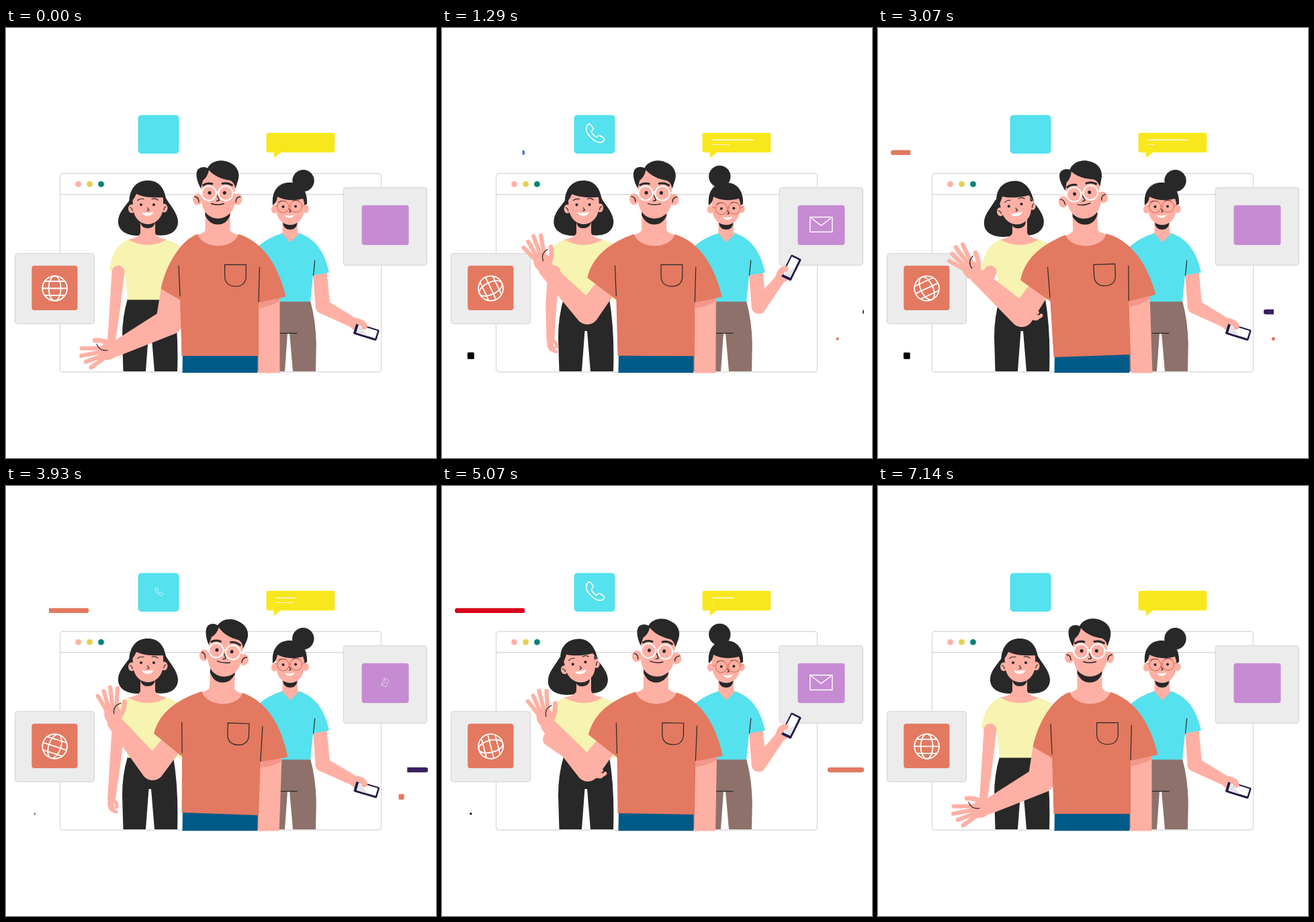
Animation, 640 px wide and 640 px high, one loop 7210 ms. Source, as an HTML page:

```html
<!DOCTYPE html>
<html lang="en">
<head>
<meta charset="utf-8">
<title>Team greeting</title>
<style>
html, body { margin: 0; width: 100%; height: 100%; overflow: hidden; background: #fff; }
svg { display: block; width: 100vw; height: 100vh; }
.skin { fill: #ffb0a4; }
.skinLine { fill: none; stroke: #ffb0a4; stroke-linecap: round; stroke-linejoin: round; }
.dark { fill: #282828; }
.ink { fill: none; stroke: #282828; stroke-linecap: round; stroke-linejoin: round; stroke-width: 1.2; }
.white { fill: none; stroke: #fff; }
.card { fill: #ececec; stroke: #d8d8d8; stroke-width: 1.3; }
.frame { fill: none; stroke: #dadada; stroke-width: 1.4; }
</style>
</head>
<body>
<svg viewBox="0 0 640 640">
  <defs>
    <clipPath id="floor"><rect width="640" height="513.5"/></clipPath>
    <clipPath id="clipA"><rect id="wipeA" y="170" height="30"/></clipPath>
    <clipPath id="clipB"><rect id="wipeB" y="410" height="30"/></clipPath>
  </defs>

  <!-- window -->
  <rect class="frame" x="80.5" y="216.5" width="478" height="295.5" rx="4"/>
  <path class="frame" d="M80.5 247.7H558.5"/>
  <circle cx="107.6" cy="232.4" r="4.4" fill="#ffb0a4"/>
  <circle cx="124.6" cy="232.4" r="4.4" fill="#e6d04e"/>
  <circle cx="141.5" cy="232.4" r="4.4" fill="#008577"/>

  <!-- loose marks -->
  <rect id="dashA" x="19" y="181.7" width="104.5" height="7.4" rx="3.7" clip-path="url(#clipA)"/>
  <rect id="dashB" x="573.8" y="418.8" width="54.4" height="7.4" rx="3.7" clip-path="url(#clipB)"/>
  <rect id="boxA" x="-5" y="-5" width="10" height="10" rx="1.5"/>
  <rect id="boxB" x="-5" y="-5" width="10" height="10" rx="1.5" fill="#e37960"/>

  <!-- call tile -->
  <rect x="196.5" y="129.5" width="61" height="57.5" rx="5" fill="#55e1ed"/>
  <path id="call" class="white" stroke-width="1.7" stroke-linejoin="round" d="M-13-9.5C-16-1 0 14 8 12.700C12 12.500 14 9.500 13.500 7L7 2.500C5 1.500 4 3.500 2 5C-1 3.500-5-.5-6-3.500C-5-5-2-6.500-3-8.500L-7.500-14.500C-10-15-12-13-13-9.500Z"/>

  <!-- speech bubble -->
  <path d="M390 156H487Q489.300 156 489.300 158V183Q489.300 185.200 487 185.200H409L399 193V185.200H390Q387.600 185.200 387.600 183V158Q387.600 156 390 156Z" fill="#f8e71c"/>
  <path id="lineA" class="white" stroke-width="1.3"/>
  <path id="lineB" class="white" stroke-width="1" opacity=".85"/>

  <!-- globe card -->
  <rect class="card" x="13.5" y="335.700" width="118" height="104.500" rx="4"/>
  <rect x="38.300" y="353.700" width="68.200" height="66.300" rx="4" fill="#e37960"/>
  <g id="globe" class="white" stroke-width="1.8">
    <circle r="18.400"/><ellipse rx="9" ry="18.400"/>
    <path d="M-18.400 0H18.400M-15.200-10.500H15.200M-15.200 10.500H15.200"/>
  </g>

  <!-- mail card -->
  <rect class="card" x="502.300" y="237.600" width="124" height="115.500" rx="4"/>
  <rect x="529.500" y="263.800" width="70" height="59.300" rx="4" fill="#c68bd2"/>
  <path id="mail" class="white" stroke-width="1.4" d="M-16.500-11H16.500V11H-16.500ZM-16.500-11L0 1.500L16.500-11"/>

  <g clip-path="url(#floor)">
    <!-- woman on the left -->
    <g>
      <path id="bob" class="dark" d="M186 253C178 266 166 275 167 290C168 304 184 310 200 309L223 308C241 311 256 304 256 288C255 274 244 264 238 253Z"/>
      <path class="dark" d="M181 403Q173 430 173 460L174.500 511H208L212.500 451H216L221 511H255Q257 450 249 403Z"/>
      <path class="skin" d="M200 280H222V305Q224 312 239 315V330H181V315Q198 312 200 305Z"/>
      <path fill="#f7f3b0" d="M182 315Q211 331 239 315C256 320 268 330 280 350V404.500H181L177 366L154 361C156 342 163 322 182 315Z"/>
      <path id="armL" class="skin"/>
      <g id="handL">
        <path class="skinLine" stroke-width="9" d="M0 0Q-3 8 1 14"/>
        <path class="skinLine" stroke-width="5" d="M0 12Q2 18 7 19M3 2Q9 5 8 12"/>
      </g>
      <g id="headL">
        <path class="dark" d="M200 286Q200 298 211 298Q222 298 222 286Z"/>
        <ellipse class="skin" cx="187" cy="269" rx="5" ry="6.500"/>
        <ellipse class="skin" cx="235.500" cy="268" rx="5" ry="6.500"/>
        <path class="skin" d="M188 245H234V267C233 283 222 292 211.500 292C200 292 190 283 189 267Z"/>
        <path class="dark" d="M183 263C183 239 194 227 211 227C228 227 238 239 239 263Q236 258 233 252C220 253 205 252 194 247Q190 256 183 263Z"/>
        <path class="ink" stroke-width="1.500" d="M196 256.500Q199 253.500 205 254.500M217 254.500Q222 252.500 226 256M210.500 267.500L213 271L210 272M184.500 267Q188 268 188 272M238 266Q235 267 235 271"/>
        <circle class="dark" cx="201" cy="263" r="2.100"/><circle class="dark" cx="220" cy="263" r="2.100"/>
        <path fill="#fff" d="M202 274.500Q211 276 219.500 274Q217 279.500 211 279.500Q204 279.500 202 274.500Z"/>
      </g>
    </g>

    <!-- woman on the right -->
    <g>
      <path fill="#8e716b" d="M370 406H453Q461 435 461.800 470L461 511H427L422 454H419L415 511H370Z"/>
      <path class="ink" stroke-width="1" d="M408 454.300H433"/>
      <path id="armR" class="skin"/>
      <g id="foreR">
        <path id="foreRshape" class="skin"/>
        <ellipse class="skin" cx="58" cy="0" rx="11.500" ry="9.500"/>
        <g transform="translate(75 3) rotate(-11)">
          <rect x="-18" y="-8.500" width="36" height="17" rx="2" fill="#201a48"/>
          <rect x="-14" y="-6.500" width="29.500" height="12" rx="1" fill="#fff"/>
          <path d="M-14-6.500L4 5.500H-14Z" fill="#e4e4e4"/>
        </g>
        <path class="skinLine" stroke-width="9" d="M58-5Q65-7 68.500-2.500"/>
      </g>
      <path class="skin" d="M411.500 280H434V304L438 308L423 325L410 308L411.500 304Z"/>
      <path fill="#55e1ed" d="M411 305.500L423 319L437 305.500C460 314 474 332 481 364L457 368L453 407.300H370V330Q388 312 411 305.500Z"/>
      <path class="ink" d="M459.700 346L457.500 368"/>
      <circle id="bun" class="dark" r="16.200"/>
      <path class="dark" d="M411.500 286Q412 300 423 300Q433.500 300 434 286Z"/>
      <ellipse class="skin" cx="399.500" cy="270" rx="4.700" ry="6"/>
      <ellipse class="skin" cx="446" cy="269.500" rx="4.700" ry="6"/>
      <path class="skin" d="M401 250H444V269C443 285 433 293 423 293C411 293 403 284 402 269Z"/>
      <path class="dark" d="M397 264C395 243 405 230 422 230C440 230 449 243 448 262L444 264Q444 258 442 254C427 258 412 256 404 251Q403 260 397 264Z"/>
      <g id="faceR">
        <path class="ink" stroke-width="1.500" d="M406 259.500Q410 256 416 258M427 257.500Q432 255 437 258.500M421.500 269L424 273.500L421.500 274"/>
        <circle class="dark" cx="412.500" cy="266" r="2"/><circle class="dark" cx="431" cy="265.500" r="2"/>
        <g fill="none" stroke="#dc7763" stroke-width="1.200">
          <circle cx="412.500" cy="266.300" r="8.700"/><circle cx="431.800" cy="265.600" r="8.700"/>
          <path d="M421 265L423.300 264.900M404 265L399 264M440.500 264.500L445 263.500"/>
        </g>
        <path fill="#fff" d="M415 278.500Q422 280 429.500 278Q427 282.500 422 282.500Q417 282.500 415 278.500Z"/>
      </g>
    </g>

    <!-- man -->
    <path fill="#005a87" d="M263 480H374.300V513.500H262.500Z"/>
    <g id="man">
      <path class="skin" d="M375.500 400H407.500V520H375.500Z"/>
      <path fill="#f4968a" d="M376 407L407.500 402V406Q394 415 376 417Z"/>
      <path id="armM" class="skin"/>
      <g id="handM">
        <ellipse class="skin" cx="1" cy="2" rx="12.500" ry="15.500"/>
        <path class="skinLine" stroke-width="6.200" d="M-7-6L-15.400-29M-3-8L-5.400-34.500M3-8L5.100-38.500M8-6L15.600-35"/>
        <path class="skinLine" stroke-width="7" d="M7 10Q18 3 22-13"/>
        <path class="ink" d="M3 1Q4-11 16-12"/>
      </g>
      <path class="skin" d="M296.500 268H333.500V301Q336 306 347 308V328H284V308Q295 305 296.500 301Z"/>
      <path fill="#e37960" d="M285 306.800C293 330 339 330 346 306.800C382 318 405 352 416.500 400L376 408.500V488H261.500L259 400L262 330Z"/>
      <path id="sleeve" fill="#e37960"/>
      <path class="ink" d="M257 354L259 399M377.300 356L376 407.500M325.500 352.300H357.300V371Q356 384.500 341.500 384.500Q327 384 325.700 371Z"/>
      <g id="headM">
        <path class="dark" d="M296.500 270V279Q303 292.500 315 292.500Q328 292.500 333.500 279V270Z"/>
        <ellipse class="skin" cx="285" cy="255" rx="7" ry="8.500"/>
        <ellipse class="skin" cx="344.500" cy="255" rx="7" ry="8.500"/>
        <path class="skin" d="M290.500 224Q300 206 316 208Q338 212 341 226V257C340 274 328 283.500 315.500 283.500C302 283.500 292 273 291 257Z"/>
        <path class="dark" d="M290 239C284 228 281 216 286 210Q292 205 300 208.500C305 198 320 194 332 200C345 205 349 217 345 228L341.500 239Q340 230 334 227C321 225 309 220 302 211.500Q300 222 293 227Z"/>
        <path class="ink" style="stroke-width:3" d="M293.500 234Q299 230 307 232M322 231.500Q330 229.500 336.500 234"/>
        <path class="ink" style="stroke-width:1.400" d="M314.500 249.500L317.500 256.500L313.500 257.500M305.500 261.500Q315 264.500 324.500 261.500M281 251Q287 252 287 259M348.500 251Q342 252 342 259"/>
        <ellipse id="eyeA" class="dark" cx="303" cy="245.300" rx="2.500"/>
        <ellipse id="eyeB" class="dark" cx="325.300" cy="245.300" rx="2.500"/>
        <g class="white" stroke-width="2">
          <circle cx="302" cy="246" r="10.700"/><circle cx="327" cy="246" r="10.700"/>
          <path d="M312.500 244.500Q314.500 243.500 316.500 244.500M291.500 245L288 244.500M337.700 245L342 244.500"/>
        </g>
      </g>
    </g>
  </g>
</svg>
<script>
const LOOP = 7.21, FPS = 14, RAD = Math.PI / 180;
const el = {};
document.querySelectorAll('[id]').forEach(n => el[n.id] = n);

const set = (id, name, value) => el[id].setAttribute(name, value);
const move = (id, value) => set(id, 'transform', value);
const mix = (a, b, k) => a + (b - a) * k;
const mixPoint = (a, b, k) => [mix(a[0], b[0], k), mix(a[1], b[1], k)];
const smooth = x => x * x * (3 - 2 * x);
const cubic = x => x < .5 ? 4 * x ** 3 : 1 - 4 * (1 - x) ** 3;

// Eased value through alternating times and values
function track(t, ...keys) {
  if (t <= keys[0]) return keys[1];
  for (let i = 2; i < keys.length; i += 2) {
    if (t < keys[i]) return mix(keys[i - 1], keys[i + 1], smooth((t - keys[i - 2]) / (keys[i] - keys[i - 2])));
  }
  return keys[keys.length - 1];
}

// Tapered capsule between two points
function limb([x1, y1], r1, [x2, y2], r2) {
  const len = Math.hypot(x2 - x1, y2 - y1) || 1;
  const nx = -(y2 - y1) / len, ny = (x2 - x1) / len;
  const p = (x, y, r) => `${x + nx * r} ${y + ny * r}`;
  return `M${p(x1, y1, r1)}A${r1} ${r1} 0 0 1 ${p(x1, y1, -r1)}` +
    `L${p(x2, y2, -r2)}A${r2} ${r2} 0 0 1 ${p(x2, y2, r2)}Z`;
}

function dash(key, x, width, t, colors) {
  const cycle = LOOP / 5 - .007, n = Math.min(4, Math.floor(t / cycle)), u = t / cycle - n;
  const from = u < .5 ? 0 : cubic(Math.min(1, u * 2 - 1));
  const to = Math.min(1, u * 2);
  set('wipe' + key, 'x', x + width * from);
  set('wipe' + key, 'width', width * Math.max(0, to - from));
  set('dash' + key, 'fill', colors[n]);
}

function marks(t) {
  dash('A', 19, 104.5, t, ['#3b78e7', '#f8e71c', '#e37960', '#d9001b', '#f8e71c']);
  dash('B', 573.8, 54.4, t, ['#282828', '#e37960', '#3a2060', '#e37960', '#3a2060']);
  const a = track(t % (LOOP / 3), 0, 0, .75, 1, 1.32, 1, 1.6, 0);
  const b = track(t % (LOOP / 4), 0, 0, .45, 1, 1.1, 1, 1.42, 0);
  move('boxA', `translate(42.9 487.8) scale(${a})`);
  move('boxB', `translate(588.5 462.6) scale(${b})`);
}

function icons(t) {
  const half = t % (LOOP / 2);
  const call = track(half, .05, 0, .65, 1, 2, 1, 2.7, 0);
  const mail = track(half, .05, 0, .75, 1, 2.55, 1, 3.05, 0);
  move('call', `translate(228 157.5) scale(${call})`);
  move('mail', `translate(564.3 292.5) rotate(${(mail - 1) * 100}) scale(${mail})`);
  move('globe', `translate(72.6 387.5) rotate(${360 * t / (LOOP - .07)})`);
  const a = track(t, 0, 0, 1.1, 62, 1.4, 62, 2.2, 0, 3.2, 62, 3.55, 62, 4.3, 0, 4.4, 0, 5.7, 62, 6.9, 0);
  const b = track(t, .3, 0, 1.3, 26, 1.6, 26, 2.4, 0, 2.7, 0, 3.6, 26, 4, 26, 4.6, 0, 4.9, 0, 5.9, 27, 6.3, 27, 7, 0);
  set('lineA', 'd', `M401.7 166.5h${a}`);
  set('lineB', 'd', `M401.7 173.5h${b}`);
}

function leftWoman(t) {
  const k = track(t, 1.15, 0, 2, 1, 3.1, 1, 3.85, 0, 4.1, 0, 4.95, 1, 6.15, 1, 7, 0);
  const elbow = mixPoint([162.5, 413], [160, 377], k);
  const wrist = mixPoint([157, 466], [223, 425], k);
  set('armL', 'd', limb([167, 363], 9.5, elbow, mix(8, 10, k)) + limb(elbow, mix(8, 10, k), wrist, 6));
  move('handL', `translate(${wrist}) rotate(${-62 * k})`);
  move('headL', `rotate(${-10 * k} 211 300)`);
  move('bob', `translate(${-9 * k} ${k}) rotate(${-3 * k} 211 290)`);
}

function rightWoman(t) {
  const k = track(t % (LOOP / 2), .28, 0, 1.1, 1, 2.1, 1, 2.95, 0);
  const elbow = [471.5, 414.5];
  set('armR', 'd', limb([467, 362], 10.5, elbow, 10.8));
  move('foreR', `translate(${elbow}) rotate(${mix(28, -52.5, k)})`);
  set('foreRshape', 'd', limb([0, 0], 10.8, [52, 0], 7.5));
  move('bun', `translate(${mix(442.5, 413.3, k)} ${mix(227.3, 221, k)})`);
  move('faceR', `translate(${3.3 * k} ${2.8 * k})`);
}

function man(t) {
  const sway = t < 3.95
    ? track(t, 1.1, 0, 2.05, 1, 3, -1, 3.95, 1)
    : Math.max(0, 1 - (t - 3.95) / 3.15) ** 1.6;
  const lift = track(t, .15, 0, 1.2, 1, 5.3, 1, 6.4, 0);
  move('man', `rotate(${2 * sway} 318 488)`);
  move('headM', `rotate(${4.6 * sway} 315 275)`);

  const shoulder = mixPoint([246, 393], [241, 390], lift);
  const elbow = mixPoint([243, 437], [216, 424], lift);
  const angle = mix(153, 226 + 2.5 * sway, lift) * RAD;
  const turn = mix(-105, -26 + 13 * sway, lift);
  const wrist = [elbow[0] + 88 * Math.cos(angle), elbow[1] + 88 * Math.sin(angle)];
  const bend = mix(20, 17.5, lift);
  set('armM', 'd', limb(shoulder, 16, elbow, bend) + limb(elbow, bend, wrist, 11.5));
  move('handM', `translate(${wrist}) rotate(${turn}) translate(-2 -15)`);

  const [x, y] = mixPoint([230.5, 388], [216, 372], lift);
  set('sleeve', 'd', `M285 306.800C262 315 ${x + 8} ${y - 39} ${x} ${y}L259.500 405L290 340Z`);

  const open = Math.abs(t - 6.07) < .08 ? .3 : 2.6;
  set('eyeA', 'ry', open);
  set('eyeB', 'ry', open);
}

function draw(t) {
  for (const part of [marks, icons, leftWoman, rightWoman, man]) part(t);
}

const start = performance.now();
function tick() {
  const t = ((performance.now() - start) / 1000) % LOOP;
  draw(Math.min(100, Math.floor((t + .005) * FPS)) / FPS);
  requestAnimationFrame(tick);
}
draw(0);
requestAnimationFrame(tick);
</script>
</body>
</html>
```
